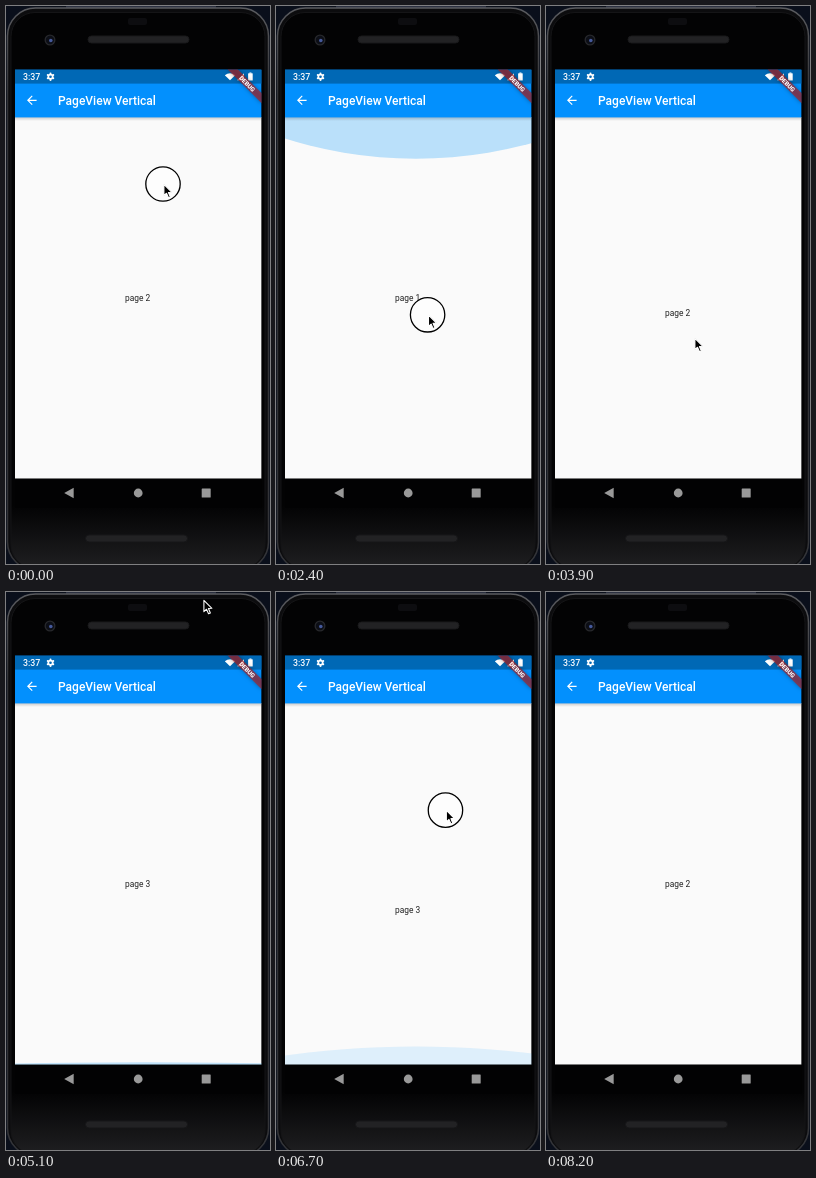
These frames come from a looping animation (264 px wide and 558 px high, 8300 ms). An HTML page with a canvas:

```html
<!DOCTYPE html>
<html lang="en">
<head>
<meta charset="utf-8">
<title>PageView Vertical</title>
<style>
html, body { margin: 0; width: 100%; height: 100%; overflow: hidden; background: #05070c; }
canvas { display: block; width: 264px; height: 558px; }
</style>
</head>
<body>
<canvas id="stage"></canvas>
<script>
const W = 264, H = 558, LOOP = 8300, STEP = 100;
const screen = { x: 9, y: 63.4, w: 246.6, h: 409.4 };
const body = { x: 9, y: 111, w: 246.6, h: 361.8 };
const DP = screen.w / 411;
const FIRST = 0, LAST = 2;
const SETTLE = 650, RECEDE = 870, TRAVEL = 150;

const canvas = document.getElementById('stage');
const ctx = canvas.getContext('2d');
const ratio = window.devicePixelRatio || 1;
canvas.width = W * ratio;
canvas.height = H * ratio;

const clamp = (v, low, high) => Math.min(high, Math.max(low, v));
const mix = (a, b, u) => a + (b - a) * u;
const easeOut = (u, power) => 1 - (1 - u) ** power;

const drag = (start, end, from, to) => ({ start, end, from, to, pressed: true });
const hover = (start, end, at) => ({ start, end, from: at, to: at, pressed: false });
const moves = [
  drag(150, 1200, [157, 178], [162, 376]),
  drag(1950, 2700, [154, 190], [150, 388]),
  drag(3000, 3500, [150, 440], [148, 332]),
  drag(4100, 4400, [150, 400], [165, 230]),
  hover(5000, 5200, [197, 8]),
  drag(5600, 6150, [168, 390], [171, 200]),
  drag(6600, 7250, [169, 192], [172, 362])
];

// A downward drag shows the previous page, an upward one the next.
let page = 1;
for (const move of moves) {
  move.page = page;
  if (move.pressed) page = clamp(page - Math.sign(move.to[1] - move.from[1]), FIRST, LAST);
  move.target = page;
}

const progress = (move, t) => clamp((t - move.start) / (move.end - move.start), 0, 1);

function scrollAt(t) {
  const move = moves.findLast(m => t >= m.start) || moves[0];
  const dragged = (move.to[1] - move.from[1]) * progress(move, t);
  const held = clamp(move.page * body.h - dragged, FIRST, LAST * body.h);
  const u = clamp((t - move.end) / SETTLE, 0, 1);
  return mix(held, move.target * body.h, easeOut(u, 3));
}

function pointerAt(t) {
  const i = Math.max(0, moves.findLastIndex(m => t >= m.start));
  const move = moves[i], next = moves[i + 1];
  const u = progress(move, t);
  const travel = next ? clamp((t - next.start + TRAVEL) / TRAVEL, 0, 1) : 0;
  return move.to.map((end, axis) => {
    const at = mix(move.from[axis], end, u);
    return next ? mix(at, next.from[axis], travel) : at;
  });
}

// Pulling past an end grows a glow; landing on an end leaves a faint one.
function glowAt(edge, t) {
  for (const move of moves) {
    if (!move.pressed || move.target !== edge || t < move.start) continue;
    if (move.page === edge) {
      const scale = easeOut(progress(move, t), 2) * clamp(1 - (t - move.end) / RECEDE, 0, 1);
      if (scale > 0) return { scale, alpha: .33 * scale };
    } else {
      const age = t - move.end - SETTLE;
      if (age >= 0 && age < 200) return { scale: .05, alpha: .25 };
    }
  }
  return null;
}

function rect(x, y, w, h, color) {
  ctx.fillStyle = color;
  ctx.fillRect(x, y, w, h);
}

function round(x, y, w, h, r, fill, stroke, line = 1) {
  ctx.beginPath();
  ctx.roundRect(x, y, w, h, r);
  ctx.fillStyle = fill;
  ctx.fill();
  if (!stroke) return;
  ctx.strokeStyle = stroke;
  ctx.lineWidth = line;
  ctx.stroke();
}

function disc(x, y, r, color) {
  ctx.beginPath();
  ctx.arc(x, y, r, 0, Math.PI * 2);
  ctx.fillStyle = color;
  ctx.fill();
}

function shape(path, x, y, scale, fill, stroke) {
  ctx.save();
  ctx.translate(x, y);
  ctx.scale(scale, scale);
  const outline = new Path2D(path);
  ctx.fillStyle = fill;
  ctx.fill(outline);
  if (stroke) {
    ctx.strokeStyle = stroke;
    ctx.lineJoin = 'round';
    ctx.stroke(outline);
  }
  ctx.restore();
}

function text(str, x, y, font, color, align = 'left') {
  ctx.font = font + ' Roboto, sans-serif';
  ctx.fillStyle = color;
  ctx.textAlign = align;
  ctx.fillText(str, x, y);
}

function fade(y0, y1, ...colors) {
  const gradient = ctx.createLinearGradient(0, y0, 0, y1);
  colors.forEach((color, i) => gradient.addColorStop(i / (colors.length - 1), color));
  return gradient;
}

function clipped(box, draw) {
  ctx.save();
  ctx.beginPath();
  ctx.rect(box.x, box.y, box.w, box.h);
  ctx.clip();
  draw();
  ctx.restore();
}

function drawPhone() {
  rect(0, 0, W, H, '#0a0f1b');
  rect(60, 0, 150, 2, '#2b3040');
  round(1.5, 2, 261, 562, 28, '#0c0c0e', fade(0, 90, '#5b5c60', '#333438'), 1.5);
  round(5, 6.5, 254, 556, 24, fade(500, H, '#030304', '#1d1d1f'), '#151517');
  round(82, 30, 101, 7, 3.5, '#222224', '#19191b');
  round(79.5, 529, 102, 7, 3.5, '#222224', '#161618');
  round(122, 12, 19, 7, 2, '#0d0d10');
  disc(44, 34, 5.5, '#27282c');
  disc(44, 34, 4.2, '#0c0e16');
  disc(44.8, 34.5, 1.8, '#45599b');
}

function drawGlow(edge, t) {
  const glow = glowAt(edge, t);
  if (!glow) return;
  const radius = body.w * 1.5;
  const depth = body.w * .75 * (2 - Math.sqrt(3));
  const bottom = edge === LAST;
  ctx.save();
  ctx.translate(140, bottom ? body.y + body.h : body.y);
  ctx.scale(1, bottom ? -glow.scale : glow.scale);
  ctx.globalAlpha = glow.alpha;
  disc(0, depth - radius, radius, '#149cf8');
  ctx.restore();
}

function drawPages(t) {
  rect(body.x, body.y, body.w, body.h, '#fafafa');
  const scroll = scrollAt(t);
  for (let i = FIRST; i <= LAST; i++) {
    text('page ' + (i + 1), 131.7, 295.2 + i * body.h - scroll, '8.4px', '#212121', 'center');
  }
  drawGlow(FIRST, t);
  drawGlow(LAST, t);
  rect(body.x, body.y, body.w, 4, fade(111, 115, 'rgba(0,0,0,.2)', 'rgba(0,0,0,0)'));
}

function drawAppBar() {
  rect(screen.x, screen.y, screen.w, 48, '#0390fd');
  rect(screen.x, screen.y, screen.w, 14.2, '#0068b5');
  const arrow = 'M20 11H7.83l5.59-5.59L12 4l-8 8 8 8 1.41-1.41L7.83 13H20z';
  shape(arrow, 25.8 - 12 * DP, 94.3 - 12 * DP, DP, '#fff');
  text('PageView Vertical', 52, 98.6, '500 12px', '#fff');
}

function drawStatus() {
  text('3:37', 17, 74, '500 8.8px', '#fff');
  for (let i = 0; i < 6; i++) {
    const a = Math.PI / 6 + i * Math.PI / 3;
    disc(44.5 + Math.cos(a) * 3.2, 70.7 + Math.sin(a) * 3.2, 1, '#fff');
  }
  disc(44.5, 70.7, 3, '#fff');
  disc(44.5, 70.7, 1.3, '#0068b5');

  shape('M0 0L-5.2 -5Q0 -9 5.2 -5Z', 224, 74.3, 1, '#fff');
  shape('M0 0H7V-7Z', 231, 74.3, 1, '#fff');
  rect(243.4, 66.5, 2, 1, '#fff');
  round(242.1, 67.2, 4.6, 7.2, .5, '#fff');
}

function drawBanner() {
  ctx.save();
  ctx.translate(screen.x + screen.w, screen.y);
  ctx.rotate(Math.PI / 4);
  ctx.shadowColor = 'rgba(0,0,0,.5)';
  ctx.shadowBlur = 4 * ratio;
  rect(-40 * DP, 28 * DP, 80 * DP, 12 * DP, 'rgba(183,28,28,.63)');
  ctx.shadowColor = 'transparent';
  text('DEBUG', 0, 22.6, '900 6.1px', '#fff', 'center');
  ctx.restore();
}

function drawNavigation() {
  rect(screen.x, body.y + body.h, screen.w, 29, '#020203');
  shape('M-5 0L4.5 -5.2V5.2Z', 63.2, 487, 1, '#999');
  disc(132.2, 487, 4.4, '#999');
  round(195.7, 482.5, 9, 9, .6, '#999');
}

function drawPointer(t) {
  const [x, y] = pointerAt(t);
  if (moves.some(m => m.pressed && t >= m.start - TRAVEL && t < m.end)) {
    ctx.beginPath();
    ctx.arc(x, y, 17.2, 0, Math.PI * 2);
    ctx.fillStyle = 'rgba(255,255,255,.45)';
    ctx.fill();
    ctx.strokeStyle = '#000';
    ctx.lineWidth = 1.3;
    ctx.stroke();
  }
  ctx.lineWidth = 1;
  shape('M0 0V10.5L2.4 8.3 4.3 12.5 6 11.8 4.2 7.6 7.4 7.4Z', x + .9, y + .3, 1.08, '#000', '#fff');
}

function draw(t) {
  ctx.setTransform(ratio, 0, 0, ratio, 0, 0);
  drawPhone();
  clipped(body, () => drawPages(t));
  clipped(screen, () => {
    drawAppBar();
    drawStatus();
    drawBanner();
  });
  drawNavigation();
  if (t < LOOP - STEP) drawPointer(t);
}

const start = performance.now();
function tick() {
  const elapsed = (performance.now() - start) % LOOP;
  draw(Math.floor(elapsed / STEP) * STEP);
  requestAnimationFrame(tick);
}
tick();
</script>
</body>
</html>
```
